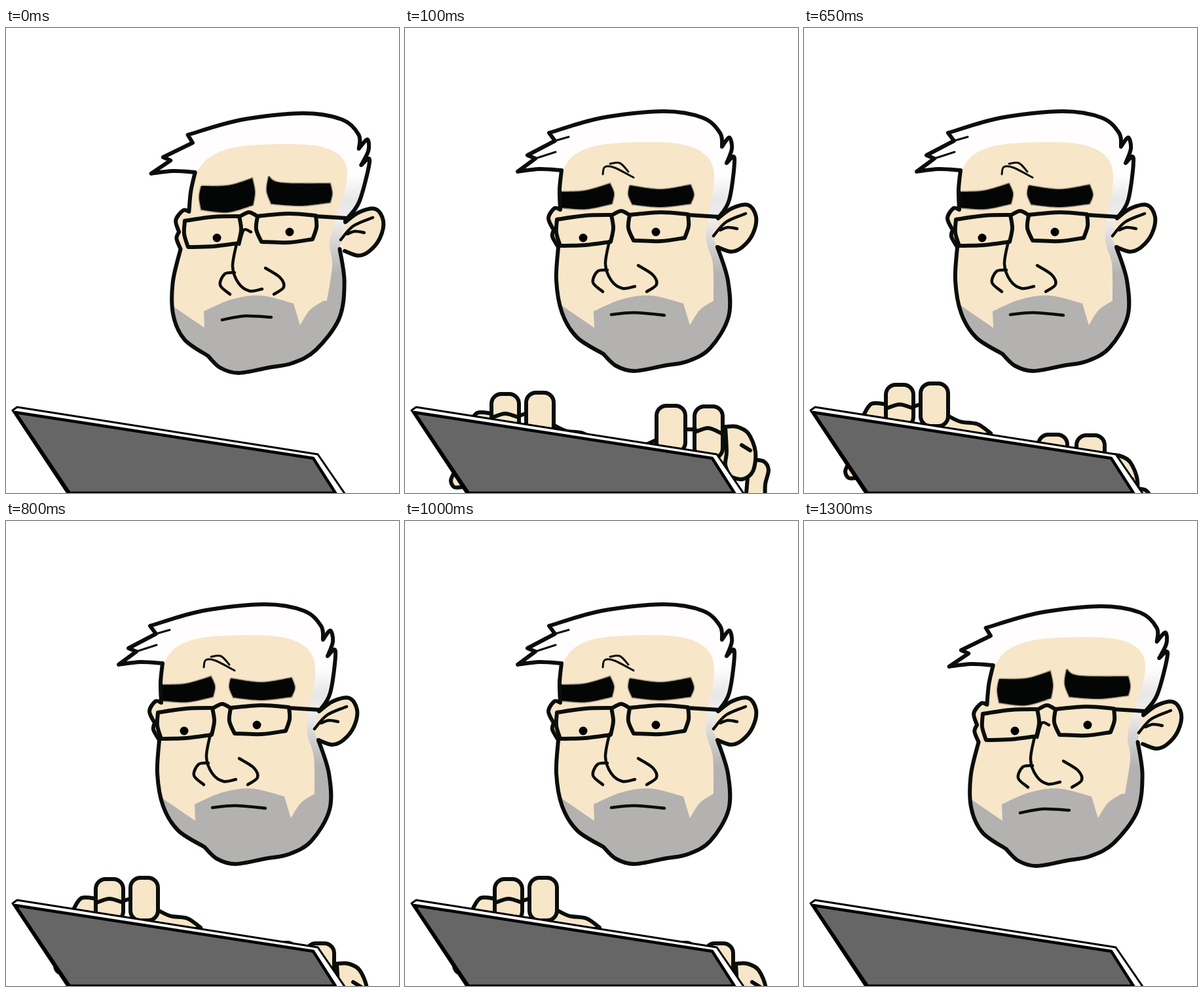
An HTML page for the animation above (1.35 s loop, 600 by 709 pixels).

```html
<!DOCTYPE html>
<html lang="en">
<head>
<meta charset="utf-8">
<title>Reading a tablet</title>
<style>
html, body { margin: 0; height: 100%; overflow: hidden; background: #fff; }
svg { display: block; width: 100%; height: 100%; }
.ink { fill: none; stroke: #0a0e0b; stroke-width: 6; stroke-linecap: round; stroke-linejoin: round; }
.mid { stroke-width: 4.5; }
.thin { stroke-width: 3; }
.skin { fill: #f8e6c9; }
.beard { fill: #b3b2b1; }
.brow { fill: #040605; stroke: #0005; stroke-width: 3; }
.tablet { fill: #fff; stroke: #000; stroke-width: 3; stroke-linejoin: round; }
.screen { fill: #666; stroke-width: 4.5; }
</style>
</head>
<body>
<svg id="stage" viewBox="0 0 600 709">
  <linearGradient id="hair" gradientUnits="userSpaceOnUse" x1="0" y1="225" x2="0" y2="375">
    <stop offset="0" stop-color="#fffdfd"/>
    <stop offset=".25" stop-color="#e8e7e7"/>
    <stop offset=".45" stop-color="#efeeee"/>
    <stop offset="1" stop-color="#b3b2b1"/>
  </linearGradient>
</svg>
<script>
const stage = document.getElementById('stage');

// Smooth line through "x,y" points: "|" makes a corner, ";" starts a new line.
function spline(text, move = p => p) {
  return text.split(';').map(line => {
    let d = '', last;
    for (const run of line.split('|')) {
      const a = run.trim().split(' ').map(p => move(p.split(',').map(Number)));
      if (last) a.unshift(last); else d = 'M' + a[0];
      for (let i = 1; i < a.length; i++) {
        const p = a[i - 1], q = a[i], before = a[i - 2] || p, after = a[i + 1] || q;
        const c1 = p.map((v, k) => v + (q[k] - before[k]) / 6);
        const c2 = q.map((v, k) => v - (after[k] - p[k]) / 6);
        d += `C${c1} ${c2} ${q}`;
      }
      last = a[a.length - 1];
    }
    return d;
  }).join('');
}

const path = (cls, text, move) => `<path class="${cls}" d="${spline(text, move)}"/>`;
const slide = ([dx, dy]) => ([x, y]) => [x + dx, y + dy];

// The head leans: the sideways shift depends on the height.
const heights = [150, 215, 280, 400, 500];
const lean = (shifts, dy) => ([x, y]) => {
  const i = Math.max(1, heights.findIndex(h => y <= h)) || 1;
  const j = y > heights[4] ? 4 : i;
  const k = Math.min(1, Math.max(0, (y - heights[j - 1]) / (heights[j] - heights[j - 1])));
  return [x + shifts[j - 1] + (shifts[j] - shifts[j - 1]) * k, y + dy];
};

const jaw = '477,334 493,385 494,440 466,488 432,508 395,515 350,523 322,515 303,497 | 263,472 240,435 231,385 234,334';
const farEar = ' | 225,318 227,308 | 219,290 228,275 237,277';
const hair = ' | 236,246 239,217 | 205,215 172,219 | 199,199 | 187,194 | 229,172 | 220,160 | 300,137 395,127 455,137 481,160 484,181 | 495,167 499,184 491,206 | 503,199 495,262 478,290';
const strands = '229,172 250,166;199,199 230,189';
const skin = '238,222 258,194 300,178 375,174 430,179 463,198 472,232 462,292 460,325 470,360 471,416 | 471,470 | 200,470 | 200,285 | 234,237';
const beard = '560,416 | 471,416 | 450,430 435,453 | 425,420 | 375,408 330,414 288,432 | 289,457 | 242,425 | 200,380 | 200,560 | 560,560';
const ear = '478,290 499,275 524,270 536,288 531,314 515,334 498,341 477,334';
const fold = '471,317 490,296 520,283;481,308 493,304 507,306';
const glasses = '232,292 | 275,286 315,285 | 318,305 314,326 | 275,331 237,332 | 231,312 232,292;343,285 | 390,281 432,284 | 433,302 427,320 | 390,325 349,324 | 341,305 343,285;315,286 330,279 344,286;432,285 480,288';
const nose = '312,325 306,360 315,385 332,397 351,394;309,369 294,371 287,388 302,402;356,362 378,376 384,391 369,402';
const brows = '235,250 275,248 313,237 | 319,252 316,268 | 277,276 238,274 | 233,262 235,250;343,240 390,246 436,239 | 441,254 436,268 | 390,273 347,269 | 341,254 343,240';
const sadBrows = '298,241 340,240 376,229 | 380,250 377,270 | 338,281 298,277 | 295,258 298,241;401,226 | 420,236 495,237 | 498,252 495,266 | 450,271 405,268 | 398,248 401,226';
const wrinkle = '302,223 305,212 320,213 349,228;313,207 328,206 341,219';

function head(name, h) {
  const move = lean(h.lean, h.dy || 0);
  const outline = jaw + (h.turned ? '' : farEar) + hair;
  const shape = spline(outline, move);
  const eye = (x, y) => `<circle cx="${x + h.eyes[0]}" cy="${y + h.eyes[1]}" r="6.5"/>`;
  stage.innerHTML += `<g id="${name}">
    <clipPath id="${name}Clip"><path d="${shape}"/></clipPath>
    <path d="${shape}" fill="url(#hair)"/>
    <g clip-path="url(#${name}Clip)">
      ${path('skin', skin, move)}
      ${path('beard', beard, slide(h.beard))}
      ${path('brow', h.brows || brows, slide(h.brow))}
    </g>
    ${path('skin', ear + ' | 469,319', slide(h.ear))}
    <path class="ink" d="${shape}"/>
    ${path('ink', ear, slide(h.ear))}
    ${path('ink mid', fold, slide(h.ear))}
    ${path('ink mid', nose, slide(h.nose))}
    ${path('ink mid', h.lines)}
    ${h.wrinkle ? path('ink thin', h.wrinkle) : ''}
    ${h.strands === false ? '' : path('ink thin', strands, move)}
    ${path('ink', glasses, slide(h.glasses))}
    ${eye(272, 320)}${eye(383, 311)}
  </g>`;
}

const still = [0, 0];
head('right', {
  lean: [59, 50, 42, 21, 5], dy: 3, beard: [14, 0], brows: sadBrows, brow: still, ear: [40, 6],
  nose: [40, 4], glasses: [41, 2], eyes: [50, 0], strands: false,
  lines: '374,311 363,308 356,330;330,445 365,439 405,441'
});
head('middle', {
  lean: [13, 12, 9, 6, 2], beard: [4, 0], brow: [17, -2], ear: [9, -1],
  nose: [19, -1], glasses: [10, -1], eyes: [11, 0],
  lines: '335,304 331,324;321,438 357,435 394,439',
  wrinkle: '327,222 329,212 345,213 372,228;337,207 352,206 364,219'
});
head('left', {
  lean: [0, 0, 0, 0, 0], beard: still, brow: still, ear: still,
  nose: still, glasses: still, eyes: still,
  lines: '315,437 350,434 396,438', wrinkle
});
head('turned', {
  lean: [26, 18, 7, 3, -2], dy: 1, beard: [-10, 2], brow: [-3, -1], ear: [9, -1], turned: true,
  nose: [-10, 0], glasses: [5, 1], eyes: [-8, 1],
  lines: '337,298 318,306 302,325;298,445 330,438 369,435',
  wrinkle: '299,220 312,214 327,219;307,206 322,207'
});

const part = text => path('skin', text) + path('ink', text);
const finger = (x, y, w, h) => `<rect class="ink" style="fill:#f8e6c9" x="${x}" y="${y}" width="${w}" height="${h}" rx="15"/>`;

stage.innerHTML += `<g id="leftHand">
  ${part('90,592 103,573 126,574 | 126,610')}
  ${part('214,588 238,600 265,604 285,618 | 214,640')}
  ${part('68,664 63,676 68,686 80,686 | 95,665')}
  ${finger(125, 544, 42, 64)}${finger(178, 542, 42, 65)}
  ${path('ink', '126,580 146,574 167,580;168,577 177,574')}
</g>
<g id="rightHand">
  ${path('skin', '480,605 | 512,605 | 512,680 | 490,680')}
  ${part('370,634 396,622 | 396,650')}
  ${part('535,680 532,715 | 562,715 | 562,690 567,668 560,655 543,652')}
  ${part('501,602 519,602 536,612 547,640 543,670 527,682 508,678 | 501,660 503,640 501,602')}
  ${finger(396, 570, 44, 71)}${finger(454, 571, 43, 79)}
  ${path('ink', '455,610 475,604 495,612;441,606 455,606;526,630 539,638')}
</g>
<path class="tablet" d="M10 583L17 578L476 650L520 714H97Z"/>
<path class="tablet screen" d="M14 586L469 656L503 709H97Z"/>`;

// start time, head, left hand offset, right hand offset
const poses = [
  [0, 'right'],
  [50, 'middle', [15, 29], [-25, 12]],
  [100, 'left', [7, 14], [-12, 6]],
  [150, 'turned', still, still],
  [650, 'left', still, [-38, 50]],
  [700, 'left', [6, 1], [-17, 61]],
  [800, 'left', [12, 2], [4, 73]],
  [900, 'left', [6, 1], [-17, 61]],
  [1000, 'left', [12, 2], [4, 73]],
  [1100, 'middle'],
  [1300, 'right']
];

const get = id => document.getElementById(id);
const show = (id, on) => get(id).setAttribute('display', on ? 'inline' : 'none');

function place(id, offset) {
  show(id, offset);
  if (offset) get(id).setAttribute('transform', `translate(${offset})`);
}

function frame(now) {
  const t = now % 1350;
  const [, pose, left, right] = poses.filter(p => p[0] <= t).pop();
  for (const name of ['right', 'middle', 'left', 'turned']) show(name, name === pose);
  place('leftHand', left);
  place('rightHand', right);
  requestAnimationFrame(frame);
}
frame(0);
</script>
</body>
</html>
```
